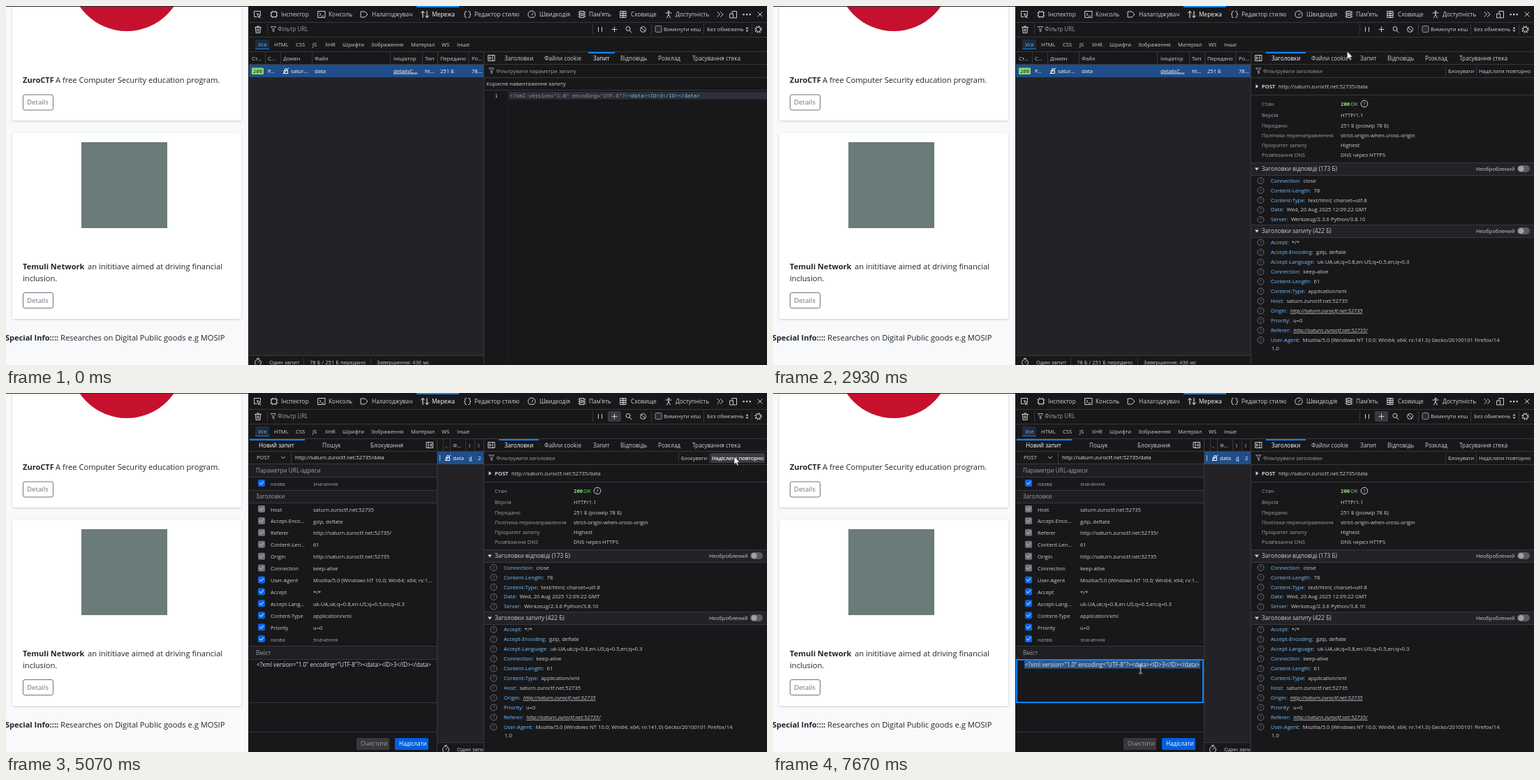
An HTML page for the animation above (8 s loop, 1090x514 px).

```html
<!DOCTYPE html>
<html lang="uk">
<head>
<meta charset="utf-8">
<title>Network panel</title>
<style>
html, body { margin: 0; width: 100%; height: 100%; overflow: hidden; background: #18181a; }
svg { display: block; font-family: "Open Sans", "Noto Sans", sans-serif; }
.mono { font-family: "Noto Sans Mono", "DejaVu Sans Mono", monospace; }
.b { font-weight: 700; }
.u { text-decoration: underline; }
.i { font-style: italic; text-decoration: underline; }
.icon { fill: none; stroke-width: 1; stroke-linecap: round; stroke-linejoin: round; }
.pointer { animation: move 8s step-end infinite; }
@keyframes move {
  0% { transform: translate(1023.5px, 424.5px); }
  6.9625% { transform: translate(1023.5px, 424.5px); animation-timing-function: steps(3, start); }
  10.2125% { transform: translate(985.5px, 344.5px); }
  11.625% { transform: translate(985.5px, 344.5px); animation-timing-function: steps(9, start); }
  19.219% { transform: translate(736px, 76px); }
  35% { transform: translate(736px, 76px); animation-timing-function: steps(7, start); }
  40.833% { transform: translate(1038px, 37px); }
  45% { transform: translate(1038px, 47px); }
  45.825% { transform: translate(1038px, 47px); animation-timing-function: steps(5, start); }
  49.95% { transform: translate(1039px, 59px); }
  52.5% { transform: translate(1039px, 59px); animation-timing-function: steps(3, start); }
  54.94% { transform: translate(1043px, 91px); }
  68.375% { transform: translate(1043px, 91px); animation-timing-function: steps(8, start); }
  74.95% { transform: translate(516.5px, 404.5px); }
  78.375% { transform: translate(516.5px, 404.5px); animation-timing-function: steps(4, start); }
  81.71%, 100% { transform: translate(526.5px, 395.5px); }
}
</style>
</head>
<body>
<script>
const LOOP = 8000, LINE = '#38383d', BG = '#18181a', LIST = '#232327', ROW = '#204e8a';
const TEXT = '#cfcfd3', DIM = '#a0a0a4', BLUE = '#75bfff', ACCENT = '#0a84ff';
let css = '';
let count = 0;

const esc = s => s.replace(/&/g, '&amp;').replace(/</g, '&lt;');
const rect = (x, y, w, h, fill, more = '') =>
  `<rect x="${x}" y="${y}" width="${w}" height="${h}" fill="${fill}" ${more}/>`;
const hline = (x, y, w, c = LINE) => rect(x, y, w, 1, c);
const vline = (x, y, h, c = LINE) => rect(x, y, 1, h, c);
// y is the middle of the line of text
const text = (x, y, s, fill = TEXT, size = 7.65, cls = '') =>
  `<text x="${x}" y="${(y + size * .34).toFixed(2)}" fill="${fill}" font-size="${size}" class="${cls}">${esc(s)}</text>`;
const texts = (y, items, fill, size) => items.map(([x, s]) => text(x, y, s, fill, size)).join('');
const icon = (x, y, d, c = TEXT) =>
  `<path class="icon" transform="translate(${x} ${y})" d="${d}" stroke="${c}"/>`;
const shape = (x, y, d, c = TEXT) => `<path transform="translate(${x} ${y})" d="${d}" fill="${c}"/>`;
const ring = (x, y, r, c) => `<circle cx="${x}" cy="${y}" r="${r}" fill="none" stroke="${c}"/>`;

// Visibility flips at each given time, starting hidden
function timed(content, ...times) {
  const name = 'w' + count++;
  const flips = times.map((t, i) => `${t / LOOP * 100}%{visibility:${i % 2 ? 'hidden' : 'visible'}}`);
  css += `@keyframes ${name}{0%{visibility:hidden}${flips.join('')}}`;
  return `<g style="visibility:hidden;animation:${name} ${LOOP}ms step-end infinite">${content}</g>`;
}

const FUNNEL = 'M-3.5-4h7l-2.7 3.4v4.2l-1.6-1v-3.2z';
const LOCK = 'M-2.5-.5h5v4h-5zM-1.5-.5v-1.5a1.5 1.5 0 0 1 3 0v1.5M-4 4L4-4';
const WATCH = 'M4.5.5a4.5 4.5 0 1 1-9 0a4.5 4.5 0 0 1 9 0M0 .5l2-2M-1.5-5.5h3';
const PANE = 'M-4.5-4h9v8h-9zM1.5-4v8';

function page() {
  const card = (y, h) => rect(9, y, 328, h, '#fff', 'rx="2.5" filter="url(#soft)"');
  const button = y => rect(24.5, y, 43, 22, '#fff', 'rx="2.5" stroke="#6c757d"') + text(30, y + 11, 'Details', '#6c757d', 9.7);
  const ink = '#212529';
  return rect(0, 0, 348, 514, '#f8f9fa') + card(-20, 184) + card(182, 266) +
    '<circle cx="173" cy="-46" r="82" fill="#c5112e"/>' +
    rect(108, 195, 123, 123, '#6a7b79') +
    text(24, 106.5, 'ZuroCTF', ink, 11.05, 'b') +
    text(71, 106.5, 'A free Computer Security education program.', ink, 11.13) + button(127) +
    text(24, 373, 'Temuli Network', ink, 11.05, 'b') +
    text(117, 373, 'an inititiave aimed at driving financial', ink, 11.13) +
    text(24, 390.5, 'inclusion.', ink, 11.13) + button(410.5) +
    text(-1, 475, 'Special Info::::', ink, 11.05, 'b') +
    text(78, 475, 'Researches on Digital Public goods e.g MOSIP', ink, 11.13) +
    hline(0, 0, 348, '#2b2a33');
}

function toolbars() {
  let s = rect(347, 0, 743, 514, BG) + rect(588, 0, 61, 2, ACCENT) +
    hline(348, 23, 742) + hline(348, 44, 742) + hline(348, 65, 742);
  s += texts(12, [[394, 'Інспектор'], [462, 'Консоль'], [524, 'Налагоджувач'], [671, 'Редактор стилю'],
    [764, 'Швидкодія'], [835, 'Пам’ять'], [895, 'Сховище'], [959, 'Доступність']], TEXT, 8.35);
  s += text(610, 12, 'Мережа', '#fff', 8.35);
  s += icon(360, 12, 'M4.5-1v-3.5h-9v8h3.5M0-1l5 2-2 1-1 2.5zM3 3l2 2') +
    icon(384, 12, 'M-3.5-3.5h7v7h-7zM-2-5v1.5M2-5v1.5M-2 3.5v1.5M2 3.5v1.5M-5-2h1.5M-5 2h1.5M3.5-2h1.5M3.5 2h1.5') +
    icon(452, 12, 'M-5-4.5h10v9h-10zM-3-2l2 2-2 2M0 2.5h2.5') +
    icon(513, 12, 'M-4.5-4h5.5l4 4-4 4h-5.5z') +
    icon(600, 12, 'M-3 4.5v-9M-5.5-2l2.5-2.5 2.5 2.5M3-4.5v9M.5 2l2.5 2.5 2.5-2.5', '#fff') +
    icon(661, 12, 'M-1.5-4.5h-1q-1 0-1 1.5v1.5q0 1.5-1.5 1.5q1.5 0 1.5 1.5v1.5q0 1.5 1 1.5h1M1.5-4.5h1q1 0 1 1.5v1.5q0 1.5 1.5 1.5q-1.5 0-1.5 1.5v1.5q0 1.5-1 1.5h-1') +
    icon(753, 12, 'M-3.5 4a5.2 5.2 0 1 1 7 0zM0 1l2-3') +
    icon(825, 12, 'M-3-4.5h6v9h-6zM-5-3h2M-5 0h2M-5 3h2M3-3h2M3 0h2M3 3h2M-1-2h2v4h-2z') +
    icon(884, 12, 'M-4-4.5h8v9h-8zM-4-1.5h8M-4 1.5h8M-1.5-3h3M-1.5 0h3M-1.5 3h3') +
    icon(949, 12, 'M-4-2h8M0-2v2.5M0 .5l-2.5 4.5M0 .5l2.5 4.5M1-4a1 1 0 1 1-2 0a1 1 0 0 1 2 0') +
    icon(1023, 12, 'M-4-3.5l3.5 3.5-3.5 3.5M.5-3.5l3.5 3.5-3.5 3.5') +
    icon(1042, 12, 'M-2-1.5v-3h6.5v9.5h-4M-5-1h4.5v6h-4.5z') +
    shape(1061, 12, 'M-5.5-1h2.2v2.2h-2.2zM-1-1h2.2v2.2h-2.2zM3.5-1h2.2v2.2h-2.2z') +
    icon(1080, 12, 'M-3-3l6 6M3-3l-6 6');
  s += icon(361, 33.5, 'M-4.5-3h9M-1.5-3v-1.5h3v1.5M-3.5-3l.5 8h6l.5-8M-1-1v4M1-1v4') + vline(374, 26, 15) +
    icon(383, 33.5, FUNNEL, DIM) + text(389, 33.5, 'Фільтр URL', DIM, 8.1) +
    vline(840, 26, 15) + icon(851, 33.5, 'M-2.5-3v6M2.5-3v6') +
    timed(rect(862, 26, 19, 15, '#3a3a40', 'rx="2"'), 5070, LOOP) +
    icon(871.5, 33.5, 'M-3.5 0h7M0-3.5v7') +
    icon(892, 33.5, 'M2-1a3 3 0 1 1-6 0a3 3 0 0 1 6 0M1 1.5l3 3') +
    icon(912.5, 33.5, 'M4 0a4 4 0 1 1-8 0a4 4 0 0 1 8 0M-2.8-2.8l5.6 5.6') +
    vline(924, 26, 15) + rect(930, 28.5, 9, 9, '#2b2a33', 'rx="1.5" stroke="#8f8f9d"') +
    text(942, 33.5, 'Вимкнути кеш') + vline(999, 26, 15) +
    timed(rect(1003, 26, 61, 15, '#2f2f34', 'rx="2"'), 3200, 3600) +
    text(1004, 33.5, 'Без обмежень', TEXT, 7.6) + shape(1061.5, 33.5, 'M-2-1l2-2.5 2 2.5zM-2 1l2 2.5 2-2.5z') +
    vline(1068, 26, 15) + ring(1077.5, 33.5, 3.2, TEXT) +
    `<circle cx="1077.5" cy="33.5" r="4.5" fill="none" stroke="${TEXT}" stroke-width="1.5" stroke-dasharray="1.7 1.83"/>`;
  s += rect(357, 48, 20, 14, '#1d2d40', 'rx="2"') + hline(357, 61, 20, ACCENT) + text(361, 55, 'Усе', BLUE) +
    texts(55, [[384, 'HTML'], [415, 'CSS'], [439, 'JS'], [457, 'XHR'], [482, 'Шрифти'], [523, 'Зображення'],
      [580, 'Матеріал'], [624, 'WS'], [646, 'Інше']], TEXT, 7.65);
  return s;
}

function requestList() {
  return rect(348, 84, 336, 416, LIST) + rect(348, 84, 336, 18, ROW) + hline(348, 83, 336) +
    [371, 393, 438, 550, 596, 618, 662].map(x => vline(x, 66, 17)).join('') +
    texts(75.5, [[352, 'Ст...'], [375, 'С...'], [397, 'Домен'], [442, 'Файл'], [555, 'Ініціатор'], [600, 'Тип'],
      [622, 'Передано'], [667, 'Ро...']]) +
    rect(352, 88.5, 17, 9.5, '#86de74', 'rx="1.5"') + text(353.7, 93.2, '200', '#18301a', 7.5, 'mono') +
    icon(401, 93, LOCK, '#fff') +
    texts(93, [[375, 'P...'], [408, 'satur...'], [442, 'data'], [600, 'ht...'], [622, '251 Б'], [667, '78...']], '#fff') +
    text(555, 93, 'detailsC...', '#fff', 7.65, 'u') +
    hline(348, 500, 336) + icon(361, 510, WATCH) +
    texts(510, [[377, 'Один запит'], [435, '78 Б / 251 Б передано'], [531, 'Завершення: 436 мс']], TEXT, 7.65) +
    vline(426, 504, 10) + vline(522, 504, 10);
}

const TABS = [[714, 'Заголовки'], [771, 'Файли cookie'], [841, 'Запит'], [880, 'Відповідь'], [934, 'Розклад'], [983, 'Трасування стека']];
const tabs = active => TABS.map(([x, s], i) => text(x, 75, s, i === active ? '#fff' : TEXT, 8.2)).join('');

function sidebar() {
  return rect(685, 66, 405, 448, BG) + vline(684, 66, 448) + hline(685, 83, 405) + hline(685, 102, 405) +
    icon(695.5, 74.5, PANE + 'M-2.5-1.8l2 1.8-2 1.8z') +
    timed(rect(706, 66, 57, 17, '#3a3a3f'), 1470, 2800) + timed(rect(975, 66, 86, 17, '#2f2f34'), 4200, 4330) +
    icon(695.5, 93, FUNNEL, DIM);
}

function payload() {
  return tabs(2) + rect(834, 66, 38, 2, ACCENT) + text(702, 93, 'Фільтрувати параметри запиту', DIM, 7.6) +
    text(688, 111.5, 'Корисне навантаження запиту', TEXT, 7.6) + hline(685, 120, 405) +
    rect(720, 123, 370, 10.5, '#2c3038') + vline(719, 121, 393, '#202024') +
    text(700, 128.3, '1', TEXT, 7.43, 'mono') +
    text(722, 128.3, '<?xml version="1.0" encoding="UTF-8"?>', '#939395', 7.43, 'mono') +
    text(891.4, 128.3, '<data><ID>3</ID></data>', BLUE, 7.43, 'mono');
}

const HOST = 'saturn.zuroctf.net:52735';
const URL_BASE = 'http://' + HOST;
const LANGS = 'uk-UA,uk;q=0.8,en-US;q=0.5,en;q=0.3';

function headers() {
  const help = (x, y, r, c) => ring(x, y, r, c) + text(x - 1.6, y + .2, '?', c, 7);
  const band = (y, s) => rect(685, y - 9, 405, 18, '#232327') + hline(685, y - 9, 405) + hline(685, y + 9, 405) +
    shape(693, y, 'M-3-1.5h6l-3 4z') + text(700, y, s, TEXT, 8.3) + text(1007, y, 'Необроблений', TEXT, 7.55) +
    rect(1066, y - 5, 18, 10, '#5b5b60', 'rx="5"') + `<circle cx="1071.5" cy="${y}" r="4" fill="#a0a0a6"/>`;
  const rows = (top, list) => list.map(([name, value, cls = ''], i) => {
    const y = top + i * 13.95;
    return help(698.5, y, 4.5, '#6f6f75') +
      `<text x="713" y="${(y + 2.6).toFixed(2)}" font-size="7.65"><tspan fill="${BLUE}">${name}:</tspan>` +
      `<tspan dx="4" fill="${TEXT}" class="${cls}">${value}</tspan></text>`;
  }).join('');
  const facts = [[156.5, 'Версія', 'HTTP/1.1'], [171, 'Передано', '251 Б (розмір 78 Б)'],
    [185, 'Політика перенаправлення', 'strict-origin-when-cross-origin'],
    [199, 'Пріоритет запиту', 'Highest'], [213.5, 'Розв’язання DNS', 'DNS через HTTPS']];
  return tabs(0) + rect(706, 66, 57, 2, ACCENT) + text(702, 93, 'Фільтрувати заголовки', DIM, 7.6) +
    vline(963, 86, 14) + vline(1007, 86, 14) +
    timed(rect(1009, 86, 78, 14, '#3a3a40', 'rx="2"'), 4330, 5470) +
    text(967, 93, 'Блокувати', TEXT, 7.4) + text(1011, 93, 'Надіслати повторно', TEXT, 7.6) +
    timed(text(1011, 93, 'Надіслати повторно', '#e4e4e8', 7.6), 4800, 5470) +
    shape(693, 115, 'M-1.5-3v6l4-3z') + text(700, 115.5, 'POST', TEXT, 7.65, 'b') +
    text(724, 115.5, URL_BASE + '/data', TEXT, 7.6) + hline(685, 127, 405) +
    text(700, 140, 'Стан', DIM) + text(813, 140.3, '200', '#86de74', 7.3, 'mono b') + text(827, 140, 'OK', '#86de74') +
    help(847, 140, 4.8, TEXT) +
    facts.map(([y, k, v]) => text(700, y, k, DIM) + text(813, y, v)).join('') +
    band(233, 'Заголовки відповіді (173 Б)') +
    rows(250, [['Connection', 'close'], ['Content-Length', '78'], ['Content-Type', 'text/html; charset=utf-8'],
      ['Date', 'Wed, 20 Aug 2025 12:09:22 GMT'], ['Server', 'Werkzeug/2.3.6 Python/3.8.10']]) +
    band(322, 'Заголовки запиту (422 Б)') +
    rows(338.7, [['Accept', '*/*'], ['Accept-Encoding', 'gzip, deflate'], ['Accept-Language', LANGS],
      ['Connection', 'keep-alive'], ['Content-Length', '61'], ['Content-Type', 'application/xml'], ['Host', HOST],
      ['Origin', URL_BASE, 'i'], ['Priority', 'u=0'], ['Referer', URL_BASE + '/', 'i'],
      ['User-Agent', 'Mozilla/5.0 (Windows NT 10.0; Win64; x64; rv:141.0) Gecko/20100101 Firefox/14']]) +
    text(714, 490, '1.0');
}

function editor() {
  const check = (y, on) => rect(361, y - 5, 10, 10, on ? '#0a66e8' : '#737378', 'rx="2"') +
    icon(366, y, 'M-2.5 0l1.8 2 3.3-4', on ? '#fff' : '#c8c8cc');
  const field = (y, name, value, on, c) => check(y - 1, on) + text(379, y, name, c, 7.5) + text(440, y, value, c, 7.6);
  const band = (y, h, s) => rect(348, y, 269, h, '#1f1f23') + hline(348, y, 269) + hline(348, y + h, 269) +
    text(358, y + h / 2 + .3, s, DIM, 8.2);
  const fields = [['Host', HOST], ['Accept-Enco...', 'gzip, deflate'], ['Referer', URL_BASE + '/'],
    ['Content-Len...', '61'], ['Origin', URL_BASE], ['Connection', 'keep-alive'],
    ['User-Agent', 'Mozilla/5.0 (Windows NT 10.0; Win64; x64; rv:1...'], ['Accept', '*/*'], ['Accept-Lang...', LANGS],
    ['Content-Type', 'application/xml'], ['Priority', 'u=0'], ['назва', 'значення']];
  const xml = '<?xml version="1.0" encoding="UTF-8"?><data><ID>3</ID></data>';
  const body = x => text(x, 389, xml, '#e4e4e8', 8.12);

  const form = rect(348, 66, 269, 448, BG) + hline(348, 83, 269) + rect(349, 66, 79, 2, ACCENT) +
    text(362, 75, 'Новий запит', '#fff', 8.2) + text(453, 75, 'Пошук', TEXT, 8.2) + text(522, 75, 'Блокування', TEXT, 8.2) +
    icon(607, 74.5, 'M-4.5-4h9v8h-9zM-2-4v8M2-1.8l-2 1.8 2 1.8z') +
    text(359, 92.5, 'POST', TEXT, 7.65) + icon(397, 92.5, 'M-2.5-1.2l2.5 2.5 2.5-2.5') + vline(408, 84, 17) +
    text(414, 92.5, URL_BASE + '/data', '#e4e4e8', 7.6) +
    band(101, 19, 'Параметри URL-адреси') + field(130, 'назва', 'значення', true, DIM) +
    band(139, 18, 'Заголовки') +
    fields.map(([k, v], i) => field(167 + i * 16.92, k, v, i > 5, i > 10 ? DIM : TEXT)).join('') +
    band(362, 19, 'Вміст') + hline(348, 443, 269) + hline(348, 485, 269) +
    rect(502, 494, 47, 17, '#38383d', 'rx="1.5"') + text(508, 502.5, 'Очистити', '#9a9a9f', 8.2) +
    rect(557, 494, 48, 17, '#0060df', 'rx="1.5"') + text(563, 502.5, 'Надіслати', '#fff', 8.2);

  const narrow = rect(617, 66, 67, 448, BG) + rect(617, 84, 67, 416, LIST) + rect(617, 84, 67, 18, ROW) +
    hline(617, 83, 67) + vline(617, 66, 448) + [626, 636, 658, 671].map(x => vline(x, 66, 17)).join('') +
    texts(75.5, [[630, ','], [640, 'Ф...'], [663, 'І'], [676, 'І']]) +
    vline(621, 89, 8, '#86de74') + icon(633, 93, LOCK, '#fff') + text(640, 93, 'data', '#fff') +
    text(663, 93, 'd', '#fff', 7.65, 'u') + text(676, 93, '2', '#fff') +
    hline(617, 500, 67) + icon(630, 510, WATCH) +
    `<g clip-path="url(#slim)">${text(646, 510, 'Один запит')}</g>`;

  return timed(form + narrow, 5070, LOOP) + timed(body(359), 5070, 6800) +
    timed(rect(349, 382, 267, 61, BG, `stroke="${ACCENT}" stroke-width="2"`), 6800, LOOP) +
    timed(rect(360, 383, 252, 11.5, '#31588a'), 7670, LOOP) + timed(body(361), 6800, LOOP) +
    timed(vline(524, 383, 11, '#fff'), 6800, 7530);
}

function pointer() {
  const arrow = '<path d="M0 0v11.3l2.6-2.4 1.8 4 1.9-.8-1.8-3.9h3.5z" fill="#fff" stroke="#111" stroke-width=".6"/>';
  const beam = '<path d="M-2.5-6h2l.5.5.5-.5h2M0-5.5v11M-2.5 6h2l.5-.5.5.5h2" fill="none" stroke="#e8e8e8"/>';
  return `<g class="pointer">${timed(arrow, 1402.5, 5864)}${timed(beam, 470, 1402.5, 5864, LOOP)}</g>`;
}

const scene = page() + toolbars() + requestList() + sidebar() + timed(payload(), 0, 2270) +
  timed(headers(), 2270, LOOP) + editor() + pointer();
document.body.innerHTML = `<style>${css}</style>
<svg width="1090" height="514" viewBox="0 0 1090 514">
  <defs>
    <filter id="soft" x="-10%" y="-10%" width="120%" height="120%">
      <feDropShadow dx="0" dy="1" stdDeviation="1.5" flood-color="#000" flood-opacity=".18"/>
    </filter>
    <clipPath id="slim"><rect x="617" y="500" width="67" height="14"/></clipPath>
  </defs>${scene}</svg>`;
</script>
</body>
</html>
```
